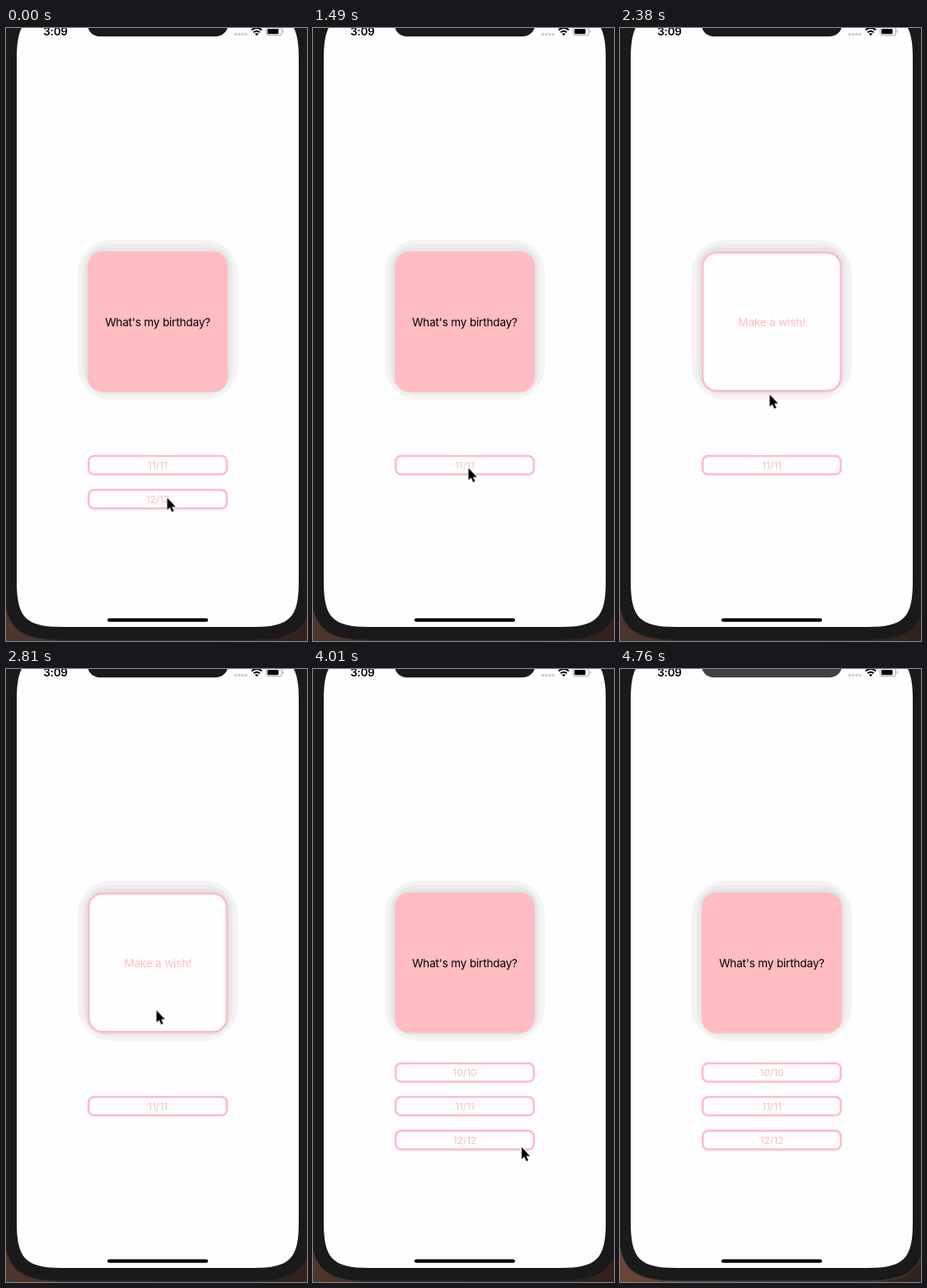
Write an HTML page that moves like this. It is 365x742 px and loops after 4.86 s.

```html
<!DOCTYPE html>
<html lang="en">
<head>
<meta charset="utf-8">
<title>Birthday quiz</title>
<style>
html, body { margin: 0; width: 100%; height: 100%; overflow: hidden; background: #1a1a1a; }
svg { display: block; width: 365px; height: 742px; font-family: Inter, "Liberation Sans", sans-serif; }
svg * { animation: 4860ms step-end infinite; }
text { text-anchor: middle; }

.shell { fill: #1a1a1a; animation-name: shell; }
.rim { stroke: #2b2929; animation-name: rim; }
.desk { animation-name: desk; }
.option rect { fill: none; stroke: #ffbcc1; stroke-width: 2.5px; }
.option text { fill: #ffbcc1; font-size: 12px; }
.label { font-size: 13.6px; letter-spacing: -.015em; }
.front { animation-name: front; }
.back { animation-name: back; }
.ten { animation-name: ten; }
.twelve { animation-name: twelve; }
.eleven text { animation-name: press-eleven; }
.twelve text { animation-name: press-twelve; }
.cursor { animation-name: move; }

@keyframes shell { 0% { fill: #1a1a1a; } 97.93%, to { fill: #414141; } }
@keyframes rim { 0% { stroke: #2b2929; } 97.93%, to { stroke: #4b4847; } }
@keyframes desk { 0% { stop-color: #4d362b; } 97.93%, to { stop-color: #694636; } }
@keyframes front {
  0% { visibility: visible; }
  39.91% { visibility: hidden; }
  67.07%, to { visibility: visible; }
}
@keyframes back {
  0% { visibility: hidden; }
  39.91% { visibility: visible; }
  67.07%, to { visibility: hidden; }
}
@keyframes ten { 0% { visibility: hidden; } 67.07%, to { visibility: visible; } }
@keyframes twelve {
  0% { visibility: visible; }
  12.34% { visibility: hidden; }
  67.07%, to { visibility: visible; }
}
@keyframes press-twelve { 0% { opacity: 1; } 9.25% { opacity: .15; } 12.34%, to { opacity: 1; } }
@keyframes press-eleven { 0% { opacity: 1; } 39.91% { opacity: .15; } 43%, to { opacity: 1; } }
@keyframes move {
  0% { transform: translate(194.5px, 568px); }
  18.51% { transform: translate(195px, 566px); }
  21.39% { transform: translate(189px, 536px); }
  24.48% { transform: translate(188.5px, 533px); }
  27.56% { transform: translate(187.5px, 533px); }
  30.65% { transform: translate(187.5px, 532px); }
  45.88% { transform: translate(185.5px, 515px); }
  48.96% { transform: translate(180.5px, 443px); }
  51.84% { transform: translate(181.5px, 418px); }
  54.93% { transform: translate(181.5px, 414px); }
  57.81% { transform: translate(181.5px, 412.5px); }
  79.41% { transform: translate(184px, 421px); }
  82.5% { transform: translate(252px, 578px); }
  85.59% { transform: translate(291px, 656px); }
  88.67% { transform: translate(328px, 710px); visibility: visible; }
  91.76%, to { transform: translate(328px, 710px); visibility: hidden; }
}
</style>
</head>
<body>
<svg viewBox="0 0 365 742">
  <defs>
    <linearGradient id="desk">
      <stop class="desk" offset="0" stop-color="#4d362b"/>
      <stop offset="1" stop-color="#34211b"/>
    </linearGradient>
    <clipPath id="view"><rect width="365" height="726"/></clipPath>
  </defs>

  <!-- phone -->
  <rect width="365" height="742" fill="url(#desk)"/>
  <path class="shell rim" d="M-3 -5V666C-3 726 12 741 72 741H296C356 741 371 726 371 666V-5Z"/>
  <path fill="#fefefe" d="M13 37C13 -7 24 -18 68 -18H300C344 -18 355 -7 355 37V670C355 714 344 725 300 725H68C24 725 13 714 13 670Z"/>
  <path class="shell" d="M98 -8C99 4 104 10.3 116 10.3H252C264 10.3 269 4 270.5 -8Z"/>

  <!-- status bar -->
  <text x="60" y="9" font-size="13.5" font-weight="600" letter-spacing="-.2">3:09</text>
  <path d="M277 7.7H293" stroke="#c9c9c9" stroke-width="2.8" stroke-dasharray="3 1.2"/>
  <g fill="none" stroke="#000" stroke-width="2">
    <path d="M297.8 2.6Q304 -2.8 310.2 2.6"/>
    <path d="M300.3 5.3Q304 2.2 307.7 5.3"/>
  </g>
  <path d="M301.8 7Q304 5.4 306.2 7L304 9.3Z"/>
  <rect x="315.5" y="-.7" width="19" height="9.6" rx="2.6" fill="none" stroke="#a3a3a3"/>
  <rect x="317" y="1" width="13.5" height="6.3" rx="1.2"/>
  <path d="M336 2.4Q338 4 336 5.8Z" fill="#999"/>

  <!-- card -->
  <rect x="87" y="256" width="194" height="194" rx="41" fill="#f3f3f3"/>
  <rect x="93" y="262" width="182" height="182" rx="31" fill="#ebebeb"/>
  <rect x="96.5" y="266" width="175" height="176" rx="24" fill="#e5e5e5"/>
  <g class="front">
    <rect x="99" y="270.5" width="170" height="170" rx="18" fill="#ffbcc1"/>
    <text class="label" x="184" y="360.6">What's my birthday?</text>
  </g>
  <g class="back">
    <rect x="100.2" y="271.7" width="167.6" height="167.6" rx="17" fill="#fefefe" stroke="#ffbcc1" stroke-width="2.5"/>
    <text class="label" x="184" y="360.6" fill="#ffbcc1">Make a wish!</text>
  </g>

  <!-- answers -->
  <g class="option ten">
    <rect x="100.2" y="477.2" width="167.6" height="22.4" rx="6.5"/>
    <text x="184" y="492.8">10/10</text>
  </g>
  <g class="option eleven">
    <rect x="100.2" y="517.9" width="167.6" height="22.4" rx="6.5"/>
    <text x="184" y="533.5">11/11</text>
  </g>
  <g class="option twelve">
    <rect x="100.2" y="559.1" width="167.6" height="22.4" rx="6.5"/>
    <text x="184" y="574.7">12/12</text>
  </g>

  <rect x="123" y="714.6" width="122" height="4.2" rx="2.1"/>

  <g clip-path="url(#view)">
    <g class="cursor">
      <path d="M1 .8V15.3L4.3 12.3 6.6 17.8 9 16.8 6.7 11.4H11.2Z" stroke="#fff" stroke-width="1.8" paint-order="stroke" stroke-linejoin="round"/>
    </g>
  </g>
</svg>
</body>
</html>
```
